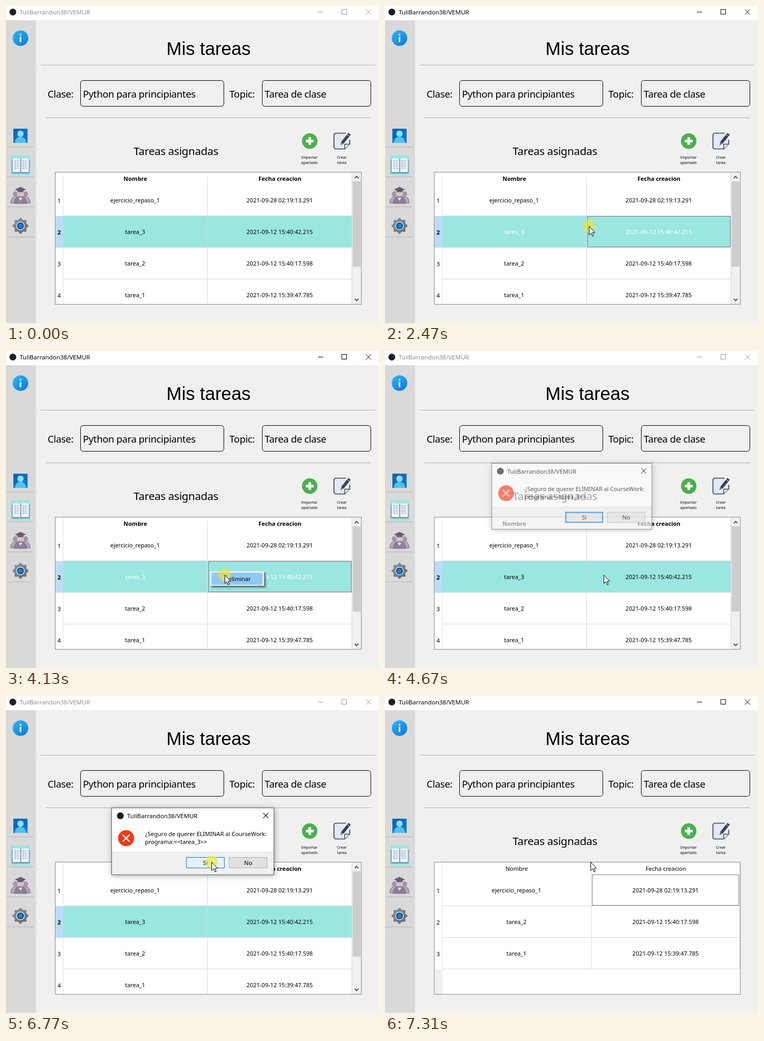
An HTML page with a canvas that plays this animation: 708x602 px, repeating every 8000 ms.

```html
<!DOCTYPE html>
<html lang="es">
<head>
<meta charset="utf-8">
<title>Mis tareas</title>
<style>
html, body { margin: 0; width: 100%; height: 100%; overflow: hidden; background: #f0f0ef; }
canvas { display: block; }
</style>
</head>
<body>
<canvas id="stage" width="708" height="602"></canvas>
<script>
const ctx = document.getElementById('stage').getContext('2d');
const LOOP = 8000;
const APP = 'TuliBarrandon38/VEMUR';
const UI = '"Noto Sans", sans-serif';
const TEAL = '#9ae6e0';
const GRID = '#d8d8d8';
const LABEL = { size: 18.5, spacing: -0.38 };

const TASKS = [
  ['ejercicio_repaso_1', '2021-09-28 02:19:13.291'],
  ['tarea_3', '2021-09-12 15:40:42.215'],
  ['tarea_2', '2021-09-12 15:40:17.598'],
  ['tarea_1', '2021-09-12 15:39:47.785']
];

// Pointer moves: start, end, steps, target x, target y, ease-out power in x and y
const MOVES = [
  [820, 1610, 13, 458, 424, 1.3, 2],
  [1680, 1940, 5, 387, 418, 1.5, 1.5],
  [3210, 3800, 10, 415, 425, 3.8, 2.45],
  [4740, 5220, 8, 428, 279, 1.6, 1.6],
  [5290, 5290, 1, 418, 286, 1, 1],
  [5360, 5770, 7, 390, 315, 1.5, 1.5]
];

function rect(x, y, w, h, color) {
  ctx.fillStyle = color;
  ctx.fillRect(x, y, w, h);
}

function frame(x, y, w, h, color, width = 1) {
  ctx.strokeStyle = color;
  ctx.lineWidth = width;
  ctx.strokeRect(x + width / 2, y + width / 2, w - width, h - width);
}

function circle(x, y, r, color) {
  ctx.fillStyle = color;
  ctx.beginPath();
  ctx.arc(x, y, r, 0, 7);
  ctx.fill();
}

function path(points, { fill, stroke, width = 1, close = false }) {
  ctx.beginPath();
  points.forEach(([x, y]) => ctx.lineTo(x, y));
  if (close) ctx.closePath();
  if (fill) { ctx.fillStyle = fill; ctx.fill(); }
  if (stroke) { ctx.strokeStyle = stroke; ctx.lineWidth = width; ctx.stroke(); }
}

function rounded(x, y, w, h, r, { fill, stroke, width = 1 }) {
  ctx.beginPath();
  ctx.roundRect(x, y, w, h, r);
  if (fill) { ctx.fillStyle = fill; ctx.fill(); }
  if (stroke) { ctx.strokeStyle = stroke; ctx.lineWidth = width; ctx.stroke(); }
}

function text(str, x, y, { size = 11, color = '#000', align = 'left', bold = false, family = UI, spacing = 0 } = {}) {
  ctx.font = `${bold ? 'bold ' : ''}${size}px ${family}`;
  ctx.letterSpacing = spacing + 'px';
  ctx.textAlign = align;
  ctx.fillStyle = color;
  ctx.fillText(str, x, y);
}

function cross(x, y, r, stroke, width = 1) {
  path([[x - r, y - r], [x + r, y + r]], { stroke, width });
  path([[x + r, y - r], [x - r, y + r]], { stroke, width });
}

function linear(x0, y0, x1, y1, from, to) {
  const g = ctx.createLinearGradient(x0, y0, x1, y1);
  g.addColorStop(0, from);
  g.addColorStop(1, to);
  return g;
}

function titleBar(active) {
  const ink = active ? '#000' : '#999';
  rect(0, 0, 708, 27, '#fff');
  circle(13, 11.5, 6.5, '#1b1f23');
  text(APP, 26, 16, { size: 11.5, color: active ? '#000' : '#8c8c8c' });
  rect(592, 11, 10, 1, ink);
  frame(637, 6, 10, 10, ink);
  cross(688, 11.5, 5, ink);
}

function infoIcon() {
  circle(27.5, 61, 14.7, linear(16, 48, 38, 74, '#2fb2f3', '#0c7ed9'));
  circle(27.5, 54.5, 1.7, '#fff');
  rect(26, 58.5, 3, 10, '#fff');
}

// Head with half an ellipse for shoulders that rest on the given base line
function person(x, y, r, base, skin, coat, outline) {
  ctx.beginPath();
  ctx.ellipse(x, base, r * 1.8, base - y - r * 0.9, 0, Math.PI, 0);
  ctx.closePath();
  ctx.fillStyle = coat;
  ctx.fill();
  if (outline) {
    ctx.strokeStyle = outline;
    ctx.lineWidth = 1;
    ctx.stroke();
  }
  circle(x, y, r, skin);
}

function userIcon() {
  rect(14, 233, 27, 27, linear(14, 233, 41, 260, '#0a63b5', '#0d7bd4'));
  person(27.5, 242.5, 6, 260, '#8fe0ff', '#4fc3f0');
}

function bookIcon() {
  rect(9, 284, 37, 38, TEAL);
  rounded(11, 291, 34, 27, 2, { fill: '#6b8fb5' });
  rect(12.5, 289.5, 14.5, 26, '#f0f4f8');
  rect(29, 289.5, 14.5, 26, '#f0f4f8');
  rect(27, 290, 2, 28, '#7d9dbf');
  for (let i = 0; i < 6; i++) {
    const y = 293 + i * 3;
    rect(16, y, 3, 1.2, '#8798aa');
    rect(20, y, 5, 1.2, '#aab7c5');
    rect(31, y, 3, 1.2, '#8798aa');
    rect(35, y, 5, 1.2, '#aab7c5');
  }
}

function studentsIcon() {
  const outline = '#75667f';
  person(18, 357, 5, 374, '#a293aa', '#b5a8bd', outline);
  person(37, 357, 5, 374, '#a293aa', '#b5a8bd', outline);
  person(27.5, 355, 6.6, 375, '#d9c3c3', '#8d7f9b', outline);
  path([[24, 364], [27.5, 370], [31, 364]], { fill: '#e8e2ec', close: true });
  path([[17, 348.5], [27.5, 343.5], [38, 348.5], [27.5, 353.5]], { fill: '#6a5b73', close: true });
  rect(22, 350, 11, 3.5, '#6a5b73');
}

function gearIcon() {
  const teeth = [];
  for (let i = 0; i < 32; i++) {
    const a = (i - 0.5) / 32 * Math.PI * 2;
    const r = i % 4 < 2 ? 15 : 12.3;
    teeth.push([27.5 + r * Math.cos(a), 417.5 + r * Math.sin(a)]);
  }
  path(teeth, { fill: linear(14, 404, 40, 432, '#8b9299', '#636a71'), close: true });
  circle(27.5, 417.5, 8, '#e8edf1');
  circle(27.5, 417.5, 6.6, '#124f8c');
  circle(27.5, 417.5, 4, '#2382cc');
}

function sidebar() {
  rect(0, 27, 57, 575, '#d9d9d9');
  infoIcon();
  userIcon();
  bookIcon();
  studentsIcon();
  gearIcon();
  for (let y = 267; y <= 438; y += 57) rect(1, y, 52, 1, '#b4b4b4');
}

function rule(x, y, w) {
  rect(x, y, w, 1, '#a0a0a0');
  rect(x, y + 1, w, 1, '#fff');
}

function field(x, w, str) {
  rounded(x + 0.5, 141.5, w, 49, 5, { stroke: '#000' });
  text(str, x + 5, 174, LABEL);
}

function addIcon() {
  circle(576.5, 256.5, 14.7, '#4caf50');
  rounded(574, 249, 5, 15, 1, { fill: '#fff' });
  rounded(569, 254, 15, 5, 1, { fill: '#fff' });
}

function editIcon() {
  const ink = '#3a414d';
  path([[643, 241], [623, 241], [623, 271], [643, 271], [652, 262], [652, 253]], { fill: '#dfe9f8' });
  path([[645, 241.5], [625, 241.5], [622.5, 244], [622.5, 269], [625, 271.5], [643, 271.5], [652.5, 262], [652.5, 254]],
    { stroke: ink, width: 1.7 });
  path([[643, 271], [643, 262.5], [652, 262.5]], { fill: '#fff', stroke: ink, width: 1.4 });
  path([[635, 264], [637, 257], [650, 241], [654.5, 244.5], [641, 261]], { fill: ink, close: true });
  path([[647.5, 244], [652, 247.5]], { stroke: '#dfe9f8', width: 1 });
  path([[637, 260], [639, 262]], { stroke: '#fff', width: 1 });
}

function page() {
  rect(0, 0, 708, 602, '#f0f0ef');
  sidebar();
  text('Mis tareas', 384.5, 93, { size: 34.67, align: 'center', family: '"Liberation Sans", sans-serif' });
  rule(66, 112, 635);
  text('Clase:', 79, 174, LABEL);
  field(141, 272, 'Python para principiantes');
  text('Topic:', 424, 174, LABEL);
  field(486, 206, 'Tarea de clase');
  rule(75, 212, 618);
  text('Tareas asignadas', 322.5, 283, { size: 20.7, align: 'center', spacing: -0.35 });
  addIcon();
  editIcon();
  const small = { size: 7.3, align: 'center' };
  text('Importar', 576, 290, small);
  text('apartado', 576, 299.5, small);
  text('Crear', 637.5, 290, small);
  text('tarea', 637.5, 299.5, small);
}

function focusRect(x, y, w, h, color) {
  ctx.setLineDash([1, 1]);
  frame(x, y, w, h, color);
  ctx.setLineDash([]);
}

function scrollBar() {
  rect(657, 316, 17, 250, '#f0f0f0');
  rect(658, 333, 15, 162, '#cdcdcd');
  const arrow = { stroke: '#505050', width: 1.8 };
  path([[662, 327], [665.5, 323.5], [669, 327]], arrow);
  path([[662, 556], [665.5, 559.5], [669, 556]], arrow);
}

function table(deleted, focused) {
  const rows = deleted ? TASKS.filter(row => row[0] !== 'tarea_3') : TASKS;
  const split = deleted ? 391 : 382;
  const right = deleted ? 673 : 656;
  const centers = [(108 + split) / 2, (split + 1 + right) / 2];
  const head = { align: 'center', bold: !deleted };
  const lineHeight = deleted ? 203 : 250;

  rect(93, 315, 582, 252, '#fff');
  ctx.save();
  ctx.beginPath();
  ctx.rect(94, 316, 580, 250);
  ctx.clip();
  text('Nombre', centers[0] + 0.5, 332, head);
  text('Fecha creacion', centers[1] + 0.5, 332, head);
  rect(108, 316, 1, lineHeight, '#e2e2e2');
  rect(right, 316, 1, lineHeight, GRID);
  rect(split, 316, 1, 23, linear(0, 316, 0, 339, '#f2f2f2', GRID));
  rows.forEach((row, i) => {
    const y = 339 + i * 60;
    const selected = !deleted && i === 1;
    if (selected) {
      rect(94, y, 15, 60, '#bcdcf6');
      rect(109, y, right - 109, 60, TEAL);
    }
    rect(109, y + 59, right - 108, 1, GRID);
    rect(split, y, 1, 60, GRID);
    text(i + 1, 101, y + 34.5, { align: 'center', bold: selected });
    row.forEach((value, col) => text(value, centers[col], y + 34,
      { align: 'center', color: selected && focused ? '#fff' : '#000' }));
  });
  if (deleted) {
    rect(94, 519, 15, 47, '#f0f0f0');
    focusRect(393, 339, 279, 59, '#000');
  } else {
    if (focused) focusRect(384, 399, 272, 59, '#651a1f');
    scrollBar();
  }
  ctx.restore();
  frame(93, 315, 582, 252, '#828790');
}

// Shadow around a box only, so that a translucent box is not darkened
function shadow(x, y, w, h, blur, offset, alpha) {
  ctx.save();
  ctx.beginPath();
  ctx.rect(0, 0, 708, 602);
  ctx.rect(x, y, w, h);
  ctx.clip('evenodd');
  ctx.shadowColor = `rgba(0,0,0,${alpha})`;
  ctx.shadowBlur = blur;
  ctx.shadowOffsetX = ctx.shadowOffsetY = offset;
  rect(x, y, w, h, '#fff');
  ctx.restore();
}

function menu(alpha, hover) {
  ctx.save();
  ctx.globalAlpha = alpha;
  shadow(387, 418, 103, 28, 3, 3, 0.5);
  rect(387, 418, 103, 28, '#f2f2f2');
  frame(387, 418, 103, 28, '#ddd');
  if (hover) rect(390, 421, 97, 23, '#90c8f6');
  text('eliminar', 422, 437);
  ctx.restore();
}

function button(x, label, fill, border, width = 1) {
  rect(x, 306, 73, 21, fill);
  frame(x, 306, 73, 21, border, width);
  text(label, x + 36.5, 321, { size: 11.5, align: 'center' });
}

function dialog(alpha, hover, pressed) {
  const scale = 0.96 + 0.04 * alpha;
  ctx.save();
  ctx.globalAlpha = alpha;
  ctx.translate(354.5, 276);
  ctx.scale(scale, scale);
  ctx.translate(-354.5, -276);
  shadow(200, 212, 309, 128, 10, 1, 0.35);
  rect(200, 212, 309, 85, '#fff');
  rect(200, 297, 309, 43, '#f0f0f0');
  rect(201, 296, 307, 1, '#dfdfdf');
  frame(200, 212, 309, 128, '#5a5a5a');
  circle(217, 227.5, 6.5, '#1b1f23');
  text(APP, 230, 232, { size: 11.5 });
  cross(493, 227, 4.8, '#000', 1.1);
  circle(228, 270, 15.2, '#f03a17');
  cross(228, 270, 6.5, '#fff', 2.4);
  text('¿Seguro de querer ELIMINAR al CourseWork:', 264, 266);
  text('programa:<<tarea_3>>', 264, 281);
  if (pressed) button(342, 'Si', '#cce4f7', '#005499');
  else if (hover) button(342, 'Si', '#e5f1fb', '#0078d7');
  else button(342, 'Si', '#e1e1e1', '#0078d7', 2);
  button(423, 'No', '#e1e1e1', '#adadad');
  ctx.restore();
}

function pointerAt(t) {
  if (t < 540) return null;
  if (t < 610) return [674, 595];
  if (t < 680) return [687, 590];
  if (t < 820) return null;
  let pos = [712, 600];
  for (const [start, end, steps, x, y, kx, ky] of MOVES) {
    if (t < start) break;
    const gap = (end - start) / (steps - 1) || 1;
    const step = Math.min(steps, Math.floor((t - start) / gap + 0.1) + 1);
    const left = 1 - step / steps;
    pos = [x + (pos[0] - x) * left ** kx, y + (pos[1] - y) * left ** ky];
  }
  return pos.map(Math.round);
}

function pointer([x, y], clicking) {
  if (clicking) circle(x, y, 12, 'rgba(240,230,40,0.6)');
  const shape = [[0, 0], [0, 16], [3.7, 12.6], [6.3, 18.5], [8.6, 17.5], [6.1, 11.7], [11, 11.7]];
  path(shape.map(([dx, dy]) => [x + dx + 0.5, y + dy + 0.5]), { fill: '#fff', stroke: '#000', close: true });
}

const between = (t, a, b) => t >= a && t < b;

// Value of the last [time, value] pair already reached
const held = (t, pairs) => pairs.reduce((value, [at, next]) => t >= at ? next : value, 0);

function inside(pos, x, y, w, h) {
  return pos && pos[0] >= x && pos[0] < x + w && pos[1] >= y && pos[1] < y + h;
}

function draw(t) {
  const pos = pointerAt(t);
  const menuAlpha = held(t, [[2480, 0.35], [2540, 0.7], [2600, 1], [4540, 0]]);
  const dialogAlpha = held(t, [[4600, 0.3], [4670, 0.64], [4740, 1], [7170, 0.65], [7240, 0.25], [7310, 0]]);
  const focused = between(t, 2410, 4540);
  const clicking = between(t, 2410, 2540) || between(t, 4130, 4540) || between(t, 6770, 6900);

  page();
  titleBar(focused || t >= 7170);
  table(t >= 7240, focused);
  if (menuAlpha) menu(menuAlpha, inside(pos, 390, 421, 97, 23));
  if (dialogAlpha) dialog(dialogAlpha, inside(pos, 342, 306, 73, 21), between(t, 6840, 6900));
  if (pos) pointer(pos, clicking);
}

let origin = null;
function tick(now) {
  origin ??= now;
  draw((now - origin) % LOOP);
  requestAnimationFrame(tick);
}
requestAnimationFrame(tick);
</script>
</body>
</html>
```
